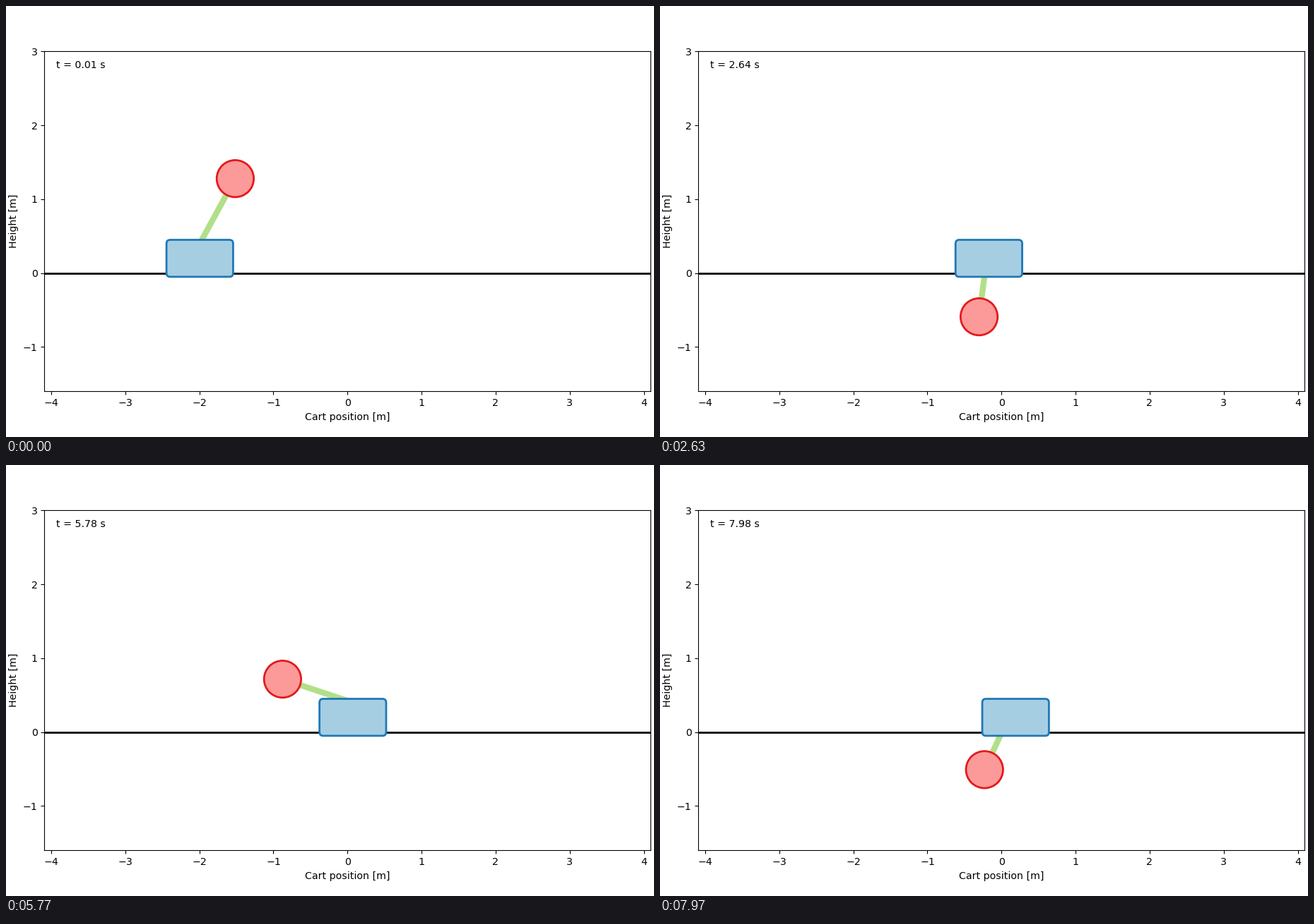
Write a matplotlib script that moves like this. It is 917 by 611 pixels and loops after 8.01 s.

```python
import matplotlib.pyplot as plt
import numpy as np
from matplotlib.animation import FuncAnimation
from matplotlib.patches import Circle, FancyBboxPatch

W, H, DPI = 917, 611, 100
TICK_MS, LOOP_MS, FPS = 30, 8010, 30
LAST_STEP = 239
PIVOT, LENGTH, RADIUS = 0.4, 1.0, 0.25
OMEGA = np.sqrt(9.81 / LENGTH)

# Moments at which the pole hangs straight down
CROSSINGS = np.array([-0.871, 0.7136, 2.6545, 4.380, 6.128, 7.897, 9.66])


def pole_angle(t):
    """Angle from hanging, for a pendulum close to its separatrix."""
    return 2 * np.arcsin(np.prod(np.tanh(OMEGA * (t - CROSSINGS))))


def cart_x(t):
    """Damped approach to the centre plus the recoil from the swinging pole."""
    drift = 0.01 - 2.884 * np.exp(-t) * np.cos(0.74 * t - 0.76)
    phase = np.pi * np.interp(t, CROSSINGS, np.arange(len(CROSSINGS)))
    recoil = 0.157 * np.cos(phase - 0.464) + 0.141 * np.sin(3 * phase - 0.142)
    return drift - recoil


plt.rcParams.update({"font.family": "DejaVu Sans", "font.size": 10.2})
fig = plt.figure(figsize=(W / DPI, H / DPI), dpi=DPI, facecolor="white")
ax = fig.add_axes([54.3 / W, 64.7 / H, 858 / W, 482 / H])
ax.set(xlim=(-4.093, 4.093), ylim=(-1.6, 3),
       xticks=range(-4, 5), yticks=range(-1, 4),
       xlabel="Cart position [m]", ylabel="Height [m]")

ax.axhline(0, color="black", lw=2, zorder=1)
rod, = ax.plot([], [], color="#b2df8a", lw=6, zorder=2)
cart = FancyBboxPatch((0, 0), 0.8, 0.4, boxstyle="round,pad=0.05",
                      fc="#a6cee3", ec="#1f78b4", lw=2, zorder=3)
ball = Circle((0, 0), RADIUS, fc="#fb9a99", ec="#e31a1c", lw=2, zorder=4)
ax.add_patch(cart)
ax.add_patch(ball)
clock = ax.text(0.02, 0.95, "", transform=ax.transAxes)


def update(tick):
    # The picture advances at 30 steps a second, slightly slower than the ticks
    step = min(int((tick * TICK_MS + 25) * FPS / 1000), LAST_STEP)
    t = step / FPS
    x, phi = cart_x(t), pole_angle(t)
    bx, by = x + LENGTH * np.sin(phi), PIVOT - LENGTH * np.cos(phi)
    cart.set_x(x - 0.4)
    rod.set_data([x, bx], [PIVOT, by])
    ball.center = bx, by
    clock.set_text(f"t = {t + 0.01:.2f} s")
    return rod, cart, ball, clock


anim = FuncAnimation(fig, update, frames=LOOP_MS // TICK_MS, interval=TICK_MS,
                     repeat=True, repeat_delay=0, blit=False)
plt.show()
```
